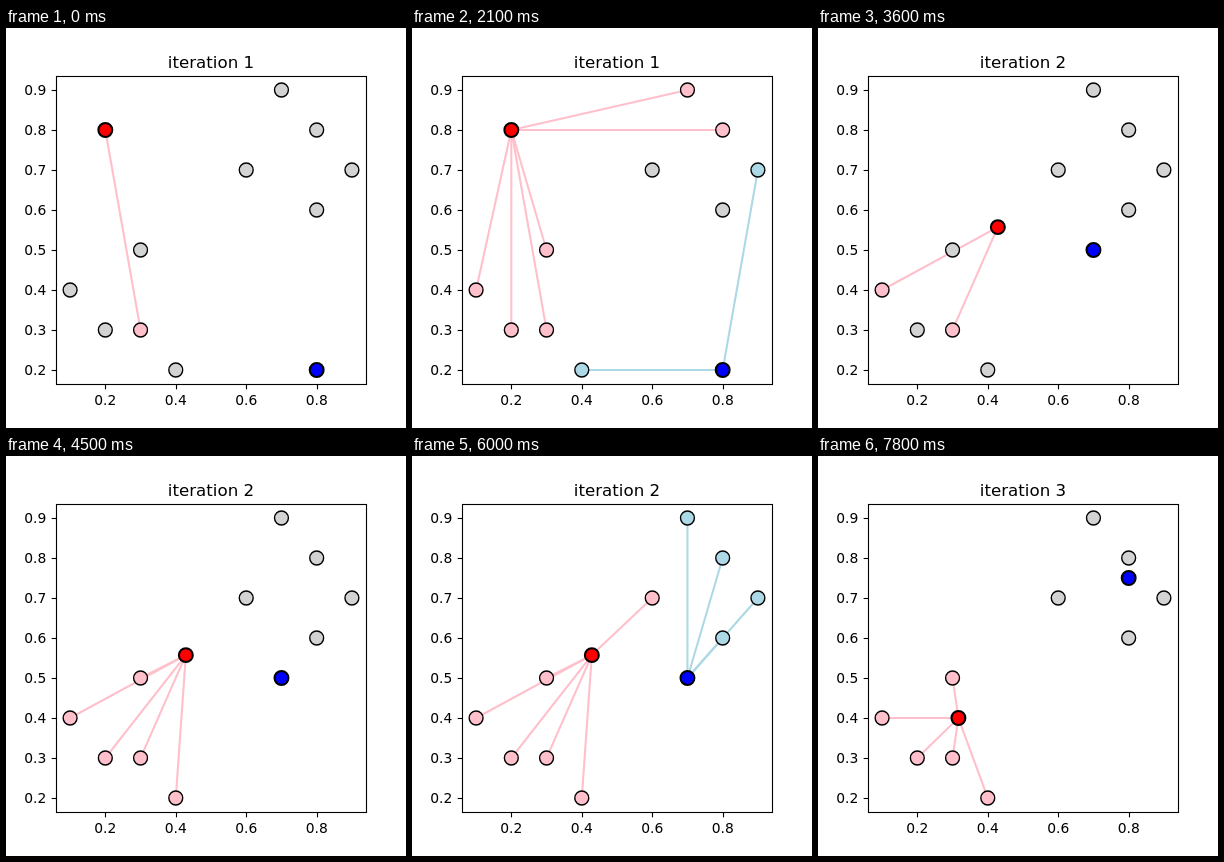
Recreate the animation shown at these times as an HTML page. Size 400 by 400 pixels, loop 8000 ms.

```html
<!DOCTYPE html>
<html lang="en">
<head>
<meta charset="utf-8">
<title>k-means</title>
<style>
  html, body { margin: 0; width: 100%; height: 100%; overflow: hidden; background: #fff; }
  svg { display: block; width: 100%; height: 100%; }
  text { font-family: "DejaVu Sans", sans-serif; font-size: 13.89px; }
  .title { font-size: 16.67px; }
  .axis { fill: none; stroke: #000; stroke-width: 1.11; }
  .link { stroke-width: 2.08; stroke-linecap: square; }
  .dot { stroke: #000; stroke-width: 1.39; }
  .center { stroke: #000; stroke-width: 2.08; }
</style>
</head>
<body>
<svg id="stage" viewBox="0 0 400 400"></svg>
<script>
const STEP = 300, LOOP = 8000;
const TINTS = ["pink", "lightblue"];
const points = [
  [.3, .3], [.1, .4], [.2, .3], [.4, .2], [.3, .5],
  [.8, .8], [.7, .9], [.9, .7], [.8, .6], [.6, .7]
];

const stage = document.getElementById("stage");
const px = x => 50 + 310 / 1.1 * ((x - .1) / .8 + .05);
const py = y => 422 - 400 * y;

function set(el, attrs) {
  for (const k in attrs) el.setAttribute(k, attrs[k]);
  return el;
}

function add(tag, attrs, text = "") {
  const el = set(document.createElementNS("http://www.w3.org/2000/svg", tag), attrs);
  el.textContent = text;
  return stage.appendChild(el);
}

const dist = (p, c) => Math.hypot(p[0] - c[0], p[1] - c[1]);
const nearest = (p, [a, b]) => dist(p, a) <= dist(p, b) ? 0 : 1;
const mean = ps => [0, 1].map(i => ps.reduce((s, p) => s + p[i], 0) / ps.length);

// Centers and point assignments of each iteration
const rounds = [];
let centers = [[.2, .8], [.8, .2]];
for (let i = 0; i < 3; i++) {
  const owner = points.map(p => nearest(p, centers));
  rounds.push({ centers, owner });
  centers = [0, 1].map(k => mean(points.filter((_, j) => owner[j] === k)));
}

const snap = v => Math.floor(v + .5) + .5;
const links = points.map(([x, y]) => add("line", { class: "link", x1: px(x), y1: py(y) }));
const dots = points.map(([x, y]) => add("circle", { class: "dot", cx: px(x), cy: py(y), r: 6.94 }));
const marks = ["red", "blue"].map(fill => add("circle", { class: "center", r: 6.94, fill }));

add("rect", { class: "axis", x: 50.5, y: 48.5, width: 310, height: 308 });
for (let i = 2; i <= 9; i++) {
  const v = i / 10, y = py(v);
  add("path", { class: "axis", d: `M50.5 ${snap(y)}h-4.86` });
  add("text", { x: 40.3, y: y + 5.2, "text-anchor": "end" }, v.toFixed(1));
  if (i % 2 === 0) {
    add("path", { class: "axis", d: `M${snap(px(v))} 356.5v4.86` });
    add("text", { x: px(v), y: 377, "text-anchor": "middle" }, v.toFixed(1));
  }
}
const title = add("text", { class: "title", x: 205, y: 40, "text-anchor": "middle" });

// Each iteration takes 11 steps: a bare one, then one more point per step
function draw(time) {
  const step = Math.floor(time % LOOP / STEP) + 1;
  const round = Math.floor(step / 11), count = step % 11;
  const { centers, owner } = rounds[round];
  title.textContent = `iteration ${round + 1}`;
  marks.forEach((m, k) => set(m, { cx: px(centers[k][0]), cy: py(centers[k][1]) }));
  points.forEach((_, j) => {
    const on = j < count, c = centers[owner[j]], tint = TINTS[owner[j]];
    set(dots[j], { fill: on ? tint : "lightgray" });
    set(links[j], { x2: px(c[0]), y2: py(c[1]), stroke: on ? tint : "none" });
  });
}

const start = performance.now();
function tick() {
  draw(performance.now() - start);
  requestAnimationFrame(tick);
}
tick();
</script>
</body>
</html>
```
